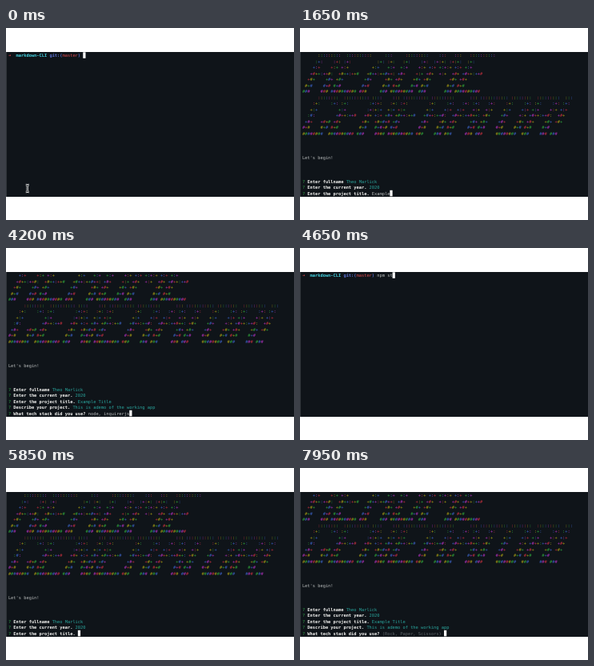
An HTML page with a canvas that plays this animation: 360x240 px, repeating every 8000 ms.

```html
<!DOCTYPE html>
<html lang="en">
<head>
<meta charset="utf-8">
<title>Terminal session</title>
<style>
  html, body { margin: 0; width: 100%; height: 100%; overflow: hidden; background: #fff; }
  canvas { display: block; width: 360px; height: 240px; }
</style>
</head>
<body>
<canvas id="stage" width="360" height="240"></canvas>
<script>
const ctx = document.getElementById("stage").getContext("2d");
ctx.textRendering = "geometricPrecision";

const LOOP = 8000, SESSION = 4350, STEP = 150;
const LEFT = 2.9, TOP = 30.3, CELL_W = 3.22, CELL_H = 7.5, ROWS = 24;
const FONT = '5.35px "DejaVu Sans Mono", "Noto Sans Mono", monospace';

const C = {
  bg: "#0f1419", edge: "#30353a", text: "#b9bcbc", bold: "#f4f4f2", dim: "#5d6468",
  green: "#2fa548", teal: "#2aa59d", cyan: "#45d6e4", blue: "#5b70cf",
  red: "#dc4a4f", cursor: "#ffffff"
};
const RAINBOW = ["#c4303f", "#a89c14", "#2fa53c", "#3b62c4", "#b032bd"];

const GLYPHS = {
  R: "      :::::::::|     :+:    :+:|    +:+    +:+|   +#++:++#:|  +#+    +#+| #+#    #+#|###    ###",
  E: "      ::::::::::|     :+:|    +:+|   +#++:++#|  +#+| #+#|##########",
  A: "          :::|       :+: :+:|     +:+   +:+|   +#++:++#++:|  +#+     +#+| #+#     #+#|###     ###",
  D: "      :::::::::|     :+:    :+:|    +:+    +:+|   +#+    +:+|  +#+    +#+| #+#    #+#|#########",
  M: "        :::   :::|      :+:+: :+:+:|    +:+ +:+:+ +:+|   +#+  +:+  +#+|  +#+       +#+| #+#       #+#|###       ###",
  G: "      ::::::::|    :+:    :+:|   +:+|  :#:| +#+   +#+#|#+#    #+#|########",
  N: "      ::::    :::|     :+:+:   :+:|    :+:+:+  +:+|   +#+ +:+ +#+|  +#+  +#+#+#| #+#   #+#+#|###    ####",
  T: "  :::::::::::|     :+:|    +:+|   +#+|  +#+| #+#|###",
  O: "      ::::::::|    :+:    :+:|   +:+    +:+|  +#+    +:+| +#+    +#+|#+#    #+#|########",
  "!": "      :::|     :+:|    +:+|   +#+|  +#+||###"
};

// Sets a word in big letters, each pushed left until one column stays free.
function bigText(word) {
  const rows = Array(7).fill("");
  for (const ch of word) {
    const glyph = GLYPHS[ch].split("|");
    const gaps = glyph.map((g, r) => g && rows[r] ? rows[r].length + 1 - g.search(/\S/) : 0);
    const col = Math.max(...gaps);
    glyph.forEach((g, r) => {
      if (g) rows[r] = rows[r].padEnd(col) + g.slice(Math.max(0, rows[r].length - col));
    });
  }
  return rows;
}

// The colours run on through the padded rows, so each row starts two further.
const rainbowLine = (str, row) =>
  [...str].map((ch, i) => [ch, RAINBOW[(i + 2 * row) % RAINBOW.length]]);

const INTRO = [
  [["> node markdown.js", C.text]], [],
  ...[...bigText("README"), ...bigText("GENERATOR!")].map(rainbowLine),
  [], [], [],
  [["Let's begin!", C.text]],
  [], [], []
];

// keys: [time, typed characters]
const QUESTIONS = [
  { label: "Enter fullname", answer: "Theo Marlick", keys: [[600, 0], [750, 0], [1050, 12]] },
  { label: "Enter the current year.", answer: "2020", keys: [[1200, 0], [1350, 4]] },
  { label: "Enter the project title.", answer: "Example Title", keys: [[1500, 0], [1800, 13]] },
  { label: "Describe your project.", answer: "This is ademo of the working app",
    keys: [[1950, 0], [2250, 9], [2850, 17], [3300, 32]] },
  { label: "What tech stack did you use?", answer: "node, inquirerjs",
    hint: "(Rock, Paper, Scissors) ", keys: [[3450, 0], [3600, 0], [4200, 16]] }
];

function typed(text, keys, t) {
  let n = keys[0][1];
  for (let i = 1; i < keys.length; i++) {
    const [t0, n0] = keys[i - 1], [t1, n1] = keys[i];
    if (t >= t0) n = n0 + (n1 - n0) * Math.min(1, (t - t0) / (t1 - t0));
  }
  return text.slice(0, Math.round(n));
}

function shellLine(t) {
  return [
    ["➜  ", C.red, true], ["markdown-CLI ", C.cyan, true],
    ["git:(", C.blue, true], ["master", C.red], [") ", C.blue, true],
    [typed("npm start", [[0, 0], [450, 9]], t), C.text]
  ];
}

function questionLine(q, active, t) {
  const line = [["? ", C.green], [q.label + " ", C.bold, true]];
  if (!active) return [...line, [q.answer, C.teal]];
  const text = typed(q.answer, q.keys, t);
  return [...line, text || !q.hint ? [text, C.text] : [q.hint, C.dim]];
}

function screenLines(t) {
  const asked = QUESTIONS.filter(q => t >= q.keys[0][0]);
  if (!asked.length) return [shellLine(t)];
  const lines = asked.map((q, i) => questionLine(q, i === asked.length - 1, t));
  return [...INTRO, ...lines].slice(-ROWS);
}

function drawLine(line, row) {
  let col = 0;
  for (const [str, color, bold] of line) {
    ctx.font = (bold ? "bold " : "") + FONT;
    ctx.fillStyle = color;
    for (const ch of str) {
      if (ch !== " ") ctx.fillText(ch, LEFT + col * CELL_W, TOP + row * CELL_H + 5.7);
      col++;
    }
  }
  return col;
}

function drawPointer(x, y) {
  const beam = () => {
    ctx.beginPath();
    ctx.moveTo(x - 2, y - 4.5);
    ctx.quadraticCurveTo(x, y - 4.5, x, y - 3);
    ctx.lineTo(x, y + 3);
    ctx.quadraticCurveTo(x, y + 4.5, x - 2, y + 4.5);
    ctx.moveTo(x + 2, y - 4.5);
    ctx.quadraticCurveTo(x, y - 4.5, x, y - 3);
    ctx.moveTo(x, y + 3);
    ctx.quadraticCurveTo(x, y + 4.5, x + 2, y + 4.5);
    ctx.stroke();
  };
  ctx.lineWidth = 2.4;
  ctx.strokeStyle = "#e4e6e6";
  beam();
  ctx.lineWidth = 0.9;
  ctx.strokeStyle = "#16191c";
  beam();
}

function draw(time) {
  const t = Math.floor(time / STEP) * STEP % SESSION;
  ctx.fillStyle = "#fff";
  ctx.fillRect(0, 0, 360, 240);
  ctx.fillStyle = C.bg;
  ctx.fillRect(0, 30, 360, 181);
  ctx.fillStyle = C.edge;
  ctx.fillRect(0, 30, 1, 181);

  const lines = screenLines(t);
  let col = 0;
  lines.forEach((line, row) => { col = drawLine(line, row); });
  ctx.fillStyle = C.cursor;
  ctx.fillRect(LEFT + col * CELL_W, TOP + (lines.length - 1) * CELL_H, CELL_W, CELL_H);
  if (t < STEP) drawPointer(26.8, 200.5);
}

const start = performance.now();
function tick() {
  draw((performance.now() - start) % LOOP);
  requestAnimationFrame(tick);
}
tick();
</script>
</body>
</html>
```
